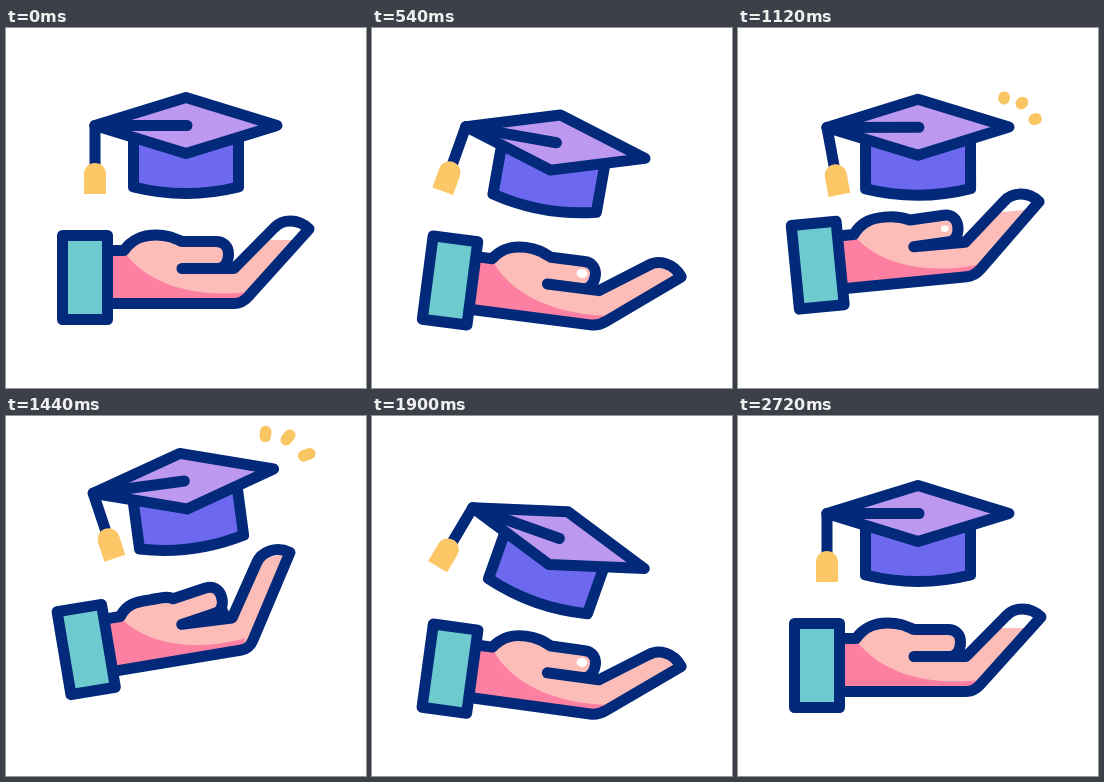
These frames come from a looping animation (360 by 360 pixels, 3 s). An HTML page:

```html
<!DOCTYPE html>
<html lang="en">
<head>
<meta charset="utf-8">
<title>Graduation cap tossed by a hand</title>
<style>
html, body { margin: 0; width: 100%; height: 100%; overflow: hidden; background: #fff; }
svg { display: block; width: 100vw; height: 100vh; }
.line { fill: none; stroke: #02297a; stroke-width: 11; stroke-linecap: round; stroke-linejoin: round; }
.gold { fill: #fcc766; }
.spark { fill: none; stroke: #fac663; stroke-width: 11.5; stroke-linecap: round; }
</style>
</head>
<body>
<svg viewBox="0 0 360 360">
  <defs><clipPath id="skin"><path id="skinShape"/></clipPath></defs>
  <g id="hand">
    <path id="palm" fill="#fcbcb8"/>
    <g clip-path="url(#skin)">
      <path fill="#fd80a2" d="M102 222H117C132 246 172 271 238 264.5L230 277H102Z"/>
      <rect id="nail" x="240" y="150" width="90" fill="#fff"/>
    </g>
    <ellipse id="shine" cx="209" cy="225.5" fill="#fff"/>
    <path id="wedge" fill="#02297a"/>
    <path id="outline" class="line"/>
    <rect class="line" x="56.5" y="207.5" width="45" height="84" style="fill:#6dcbcf"/>
  </g>
  <g id="cap">
    <path class="line" style="fill:#6d69ef" d="M127.5 108V159Q180 172 232.5 159V108Z"/>
    <path class="line" style="fill:#bc99ef" d="M89 97.5L180 69.5L271 97.5L180 125.5Z"/>
    <path class="line" d="M89 97.5H181"/>
    <g id="tassel">
      <path class="line" d="M89 97.5V138"/>
      <path class="gold" d="M78 166V146a11 11 0 0 1 22 0V166Z"/>
    </g>
    <g id="sparks" transform="translate(260 97.5)"></g>
  </g>
</svg>
<script>
const LOOP = 3000, STEP = 20, RAD = Math.PI / 180;
const START = 220, DIP = 750, TOSS = 1320, CATCH = 1840, REST = 2380;

const $ = id => document.getElementById(id);
const set = (el, attrs) => { for (const k in attrs) el.setAttribute(k, attrs[k]); };
const clamp = (v, lo = 0, hi = 1) => Math.min(hi, Math.max(lo, v));
const part = (t, a, b) => clamp((t - a) / (b - a));
const ease = (t, a, b) => { const u = part(t, a, b); return u * u * (3 - 2 * u); };

// Rest, dip, toss, catch, rest; a part may lag behind the beat.
function swing(t, dip, toss, caught, lag = 0, end = REST) {
  return dip * ease(t, START + lag, DIP + lag)
    + (toss - dip) * ease(t, DIP + lag, TOSS + lag)
    + (caught - toss) * ease(t, TOSS + lag, CATCH + lag)
    - caught * ease(t, CATCH + lag, end);
}

// Rotates points about a joint.
function joint(cx, cy, deg) {
  const c = Math.cos(deg * RAD), s = Math.sin(deg * RAD);
  return (x, y) => [cx + (x - cx) * c - (y - cy) * s, cy + (x - cx) * s + (y - cy) * c];
}

function drawHand(t) {
  const turn = swing(t, 11.3, -12.2, 8);
  const y = swing(t, 4.5, -19, 3.3);
  const drop = Math.min(1, swing(t, 2.2, -1.05, 2.2, 70, 2720));
  const lift = clamp((-turn - 4) / 5.5);

  const thumb = joint(176, 232, -9 * lift);
  const finger = joint(218, 236, 10 * drop);
  const root = thumb(176, 240.5), side = thumb(222.5, 226), under = thumb(212, 240.5);
  const fork = [228, 240.5 + 2 * lift];

  // The finger's lower edge meets the base line in a rounded corner.
  const tip = finger(303, 201), base = 275.5, slope = (48 - 10 * drop) * RAD;
  const corner = tip[0] - (base - tip[1]) / Math.tan(slope);
  const bend = [corner + 9 * Math.cos(slope), base - 9 * Math.sin(slope)];

  const hump = 207 + 4 * lift;
  const d = `M102 222.5H118C127 210 138 ${hump} 150 ${hump}S168 210 ${thumb(176, 213.5)}`
    + `L${thumb(210, 213.5)}C${thumb(218, 213.5)} ${thumb(222.5, 219)} ${side}`
    + `C${thumb(222.5, 233)} ${thumb(219, 240.5)} ${under}L${root}L${fork}`
    + `L${finger(268, 200)}C${finger(276, 191)} ${finger(292, 190)} ${tip}`
    + `L${bend}Q${corner} ${base} ${corner - 8} ${base}H102`;
  for (const id of ['skinShape', 'palm', 'outline']) set($(id), { d });
  set($('wedge'), { d: `M${root}L${under}L${side}L${fork}Z` });

  const nail = 1 - drop * drop;
  const shine = clamp(Math.abs(turn) / 4) * (1 - lift);
  set($('nail'), { height: clamp(finger(285.5, 200.5)[1] - 152.5 + 14 * nail, 0, 200) });
  set($('shine'), { rx: 5.5 * shine, ry: 4.5 * shine });
  set($('hand'), { transform: `translate(${-0.13 * turn} ${y}) rotate(${turn} 79 249.5)` });
}

const sparks = [0, 1, 2].map(() => {
  const el = document.createElementNS('http://www.w3.org/2000/svg', 'path');
  el.setAttribute('class', 'spark');
  return $('sparks').appendChild(el);
});

function drawCap(t) {
  const turn = swing(t, 17.6, -10, 19.7, 30);
  const y = swing(t, 39, -33.5, 23.8, 80);
  const sway = swing(t, 30, -26.5, 33, 0, 2220) - 6.5 * Math.sin(Math.PI * part(t, 2150, 2450));
  set($('cap'), { transform: `translate(0 ${y}) rotate(${turn} 180 117)` });
  set($('tassel'), { transform: `rotate(${sway - turn} 89 97.5)` });

  // Three rays fan out, then shrink away from the inside.
  const from = ease(t, 1300, 1580), to = ease(t, 1060, 1300);
  set($('sparks'), { visibility: to > 0 && from < 1 ? 'visible' : 'hidden' });
  sparks.forEach((el, i) => {
    const a = (78 - 33 * i) * RAD;
    const at = k => {
      const r = 29 + 4 * i + (10 + 1.5 * i) * k;
      return `${r * Math.cos(a)} ${-r * Math.sin(a)}`;
    };
    set(el, { d: `M${at(from)}L${at(to)}` });
  });
}

const start = performance.now();
function tick() {
  const t = Math.floor((performance.now() - start) % LOOP / STEP) * STEP;
  drawHand(t);
  drawCap(t);
  requestAnimationFrame(tick);
}
tick();
</script>
</body>
</html>
```
